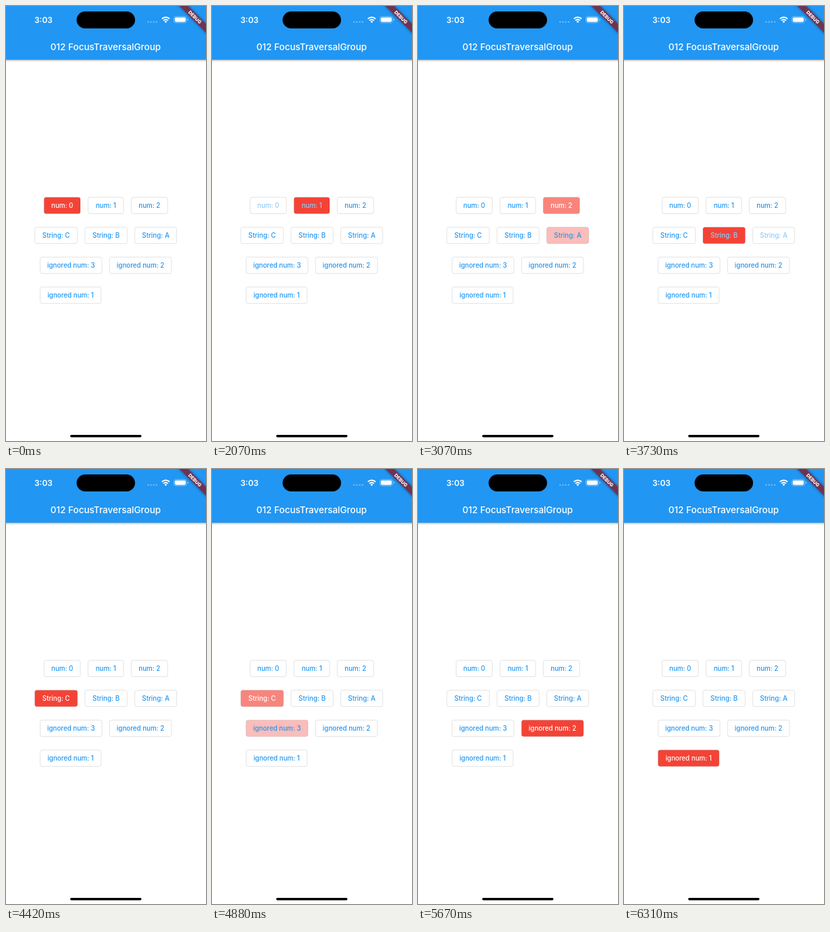
An HTML page for the animation above (6.35 s loop, 296 by 640 pixels).

```html
<!DOCTYPE html>
<html lang="en">
<head>
<meta charset="utf-8">
<style>
  html, body { margin: 0; width: 100%; height: 100%; overflow: hidden; background: #fff; }
  svg { display: block; width: 296px; height: 640px; font-family: Inter, Roboto, sans-serif; }
  text { text-anchor: middle; fill: #fff; }
  #bar { fill: #2196f3; filter: drop-shadow(0 1.5px 1.8px rgba(0, 0, 0, .38)); }
  #buttons text { font-size: 9.8px; font-weight: 500; }
  #buttons rect { stroke: rgba(0, 0, 0, .14); stroke-width: .8; }
</style>
</head>
<body>
<svg viewBox="0 0 296 640">
  <rect id="bar" x="-8" y="-8" width="312" height="87"/>
  <text x="147.5" y="64.6" font-size="13.5" font-weight="500">012 FocusTraversalGroup</text>

  <!-- status bar -->
  <text x="55.5" y="24.6" font-size="12" font-weight="600">3:03</text>
  <rect x="104.5" y="8" width="86.5" height="25" rx="12.5"/>
  <g fill="#fff" fill-opacity=".38">
    <circle cx="210.3" cy="23.4" r="1.2"/><circle cx="214.5" cy="23.4" r="1.2"/>
    <circle cx="218.7" cy="23.4" r="1.2"/><circle cx="222.9" cy="23.4" r="1.2"/>
  </g>
  <g fill="none" stroke="#fff" stroke-width="2">
    <path d="M230.7 18.9a8 8 0 0 1 11.4 0M233 21.4a4.8 4.8 0 0 1 6.8 0"/>
    <path d="M236.4 25l-1.9-2a2.8 2.8 0 0 1 3.8 0z" fill="#fff" stroke="none"/>
  </g>
  <rect x="248.4" y="15.4" width="19" height="9.4" rx="2.9" fill="none" stroke="#fff" stroke-opacity=".45" stroke-width=".8"/>
  <rect x="249.8" y="16.8" width="16.2" height="6.6" rx="1.8" fill="#fff"/>
  <path d="M268.6 18.6q1.5 .5 1.5 1.5t-1.5 1.5z" fill="#fff" fill-opacity=".5"/>

  <!-- corner banner -->
  <g transform="translate(296 0) rotate(45)">
    <rect x="-32" y="18.6" width="64" height="9.2" fill="#6f3352" style="filter: drop-shadow(0 0 2px rgba(0, 0, 0, .4))"/>
    <text y="25.8" font-size="7" font-weight="800">DEBUG</text>
  </g>

  <g id="buttons"></g>
  <rect x="95" y="631" width="105.5" height="3.6" rx="1.8"/>
</svg>
<script>
const LOOP = 6350;
const WHITE = [255, 255, 255], BLUE = [33, 150, 243], RED = [244, 67, 54];

// label, left, top, width, in focus order
const buttons = [
  ['num: 0', 56.4, 281.4, 53.6], ['num: 1', 121.4, 281.4, 52.6], ['num: 2', 185.4, 281.4, 53.8],
  ['String: A', 190.6, 325.4, 62], ['String: B', 116.9, 325.4, 62.4], ['String: C', 42.7, 325.4, 63],
  ['ignored num: 3', 50.5, 369.4, 91.5], ['ignored num: 2', 153.3, 369.4, 91.6],
  ['ignored num: 1', 50.5, 413.4, 90.3],
];

// step times of each focus change
const moves = [
  [2070, 2180], [2560, 2670, 2770], [3070, 3180, 3290], [3730, 3840],
  [4200, 4310, 4420], [4880, 4990, 5090], [5560, 5670], [6200, 6310],
];

// fill and text progress, counted back from the last step
const stages = [[1, 1], [1, .5], [.35, 0]];

const mix = (a, b, k) => `rgb(${a.map((v, i) => Math.round(v + (b[i] - v) * k))})`;

function add(tag, attrs, parent) {
  const el = document.createElementNS('http://www.w3.org/2000/svg', tag);
  for (const key in attrs) el.setAttribute(key, attrs[key]);
  return parent.appendChild(el);
}

const group = document.getElementById('buttons');
const views = buttons.map(([label, x, y, width]) => {
  const box = add('rect', { x, y, width, height: 24.2, rx: 3 }, group);
  const text = add('text', { x: x + width / 2, y: y + 15.6 }, group);
  text.textContent = label;
  return { box, text };
});

function progress(steps, t) {
  const passed = steps.filter(s => s <= t).length;
  return passed ? stages[steps.length - passed] : [0, 0];
}

function draw(t) {
  const arrived = [[1, 1], ...moves.map(m => progress(m, t)), [0, 0]];
  views.forEach(({ box, text }, i) => {
    const [fill, ink] = arrived[i].map((v, k) => v - arrived[i + 1][k]);
    box.style.fill = mix(WHITE, RED, fill);
    text.style.fill = mix(BLUE, WHITE, ink);
  });
}

const start = performance.now();
function tick() {
  draw((performance.now() - start) % LOOP);
  requestAnimationFrame(tick);
}
tick();
</script>
</body>
</html>
```
